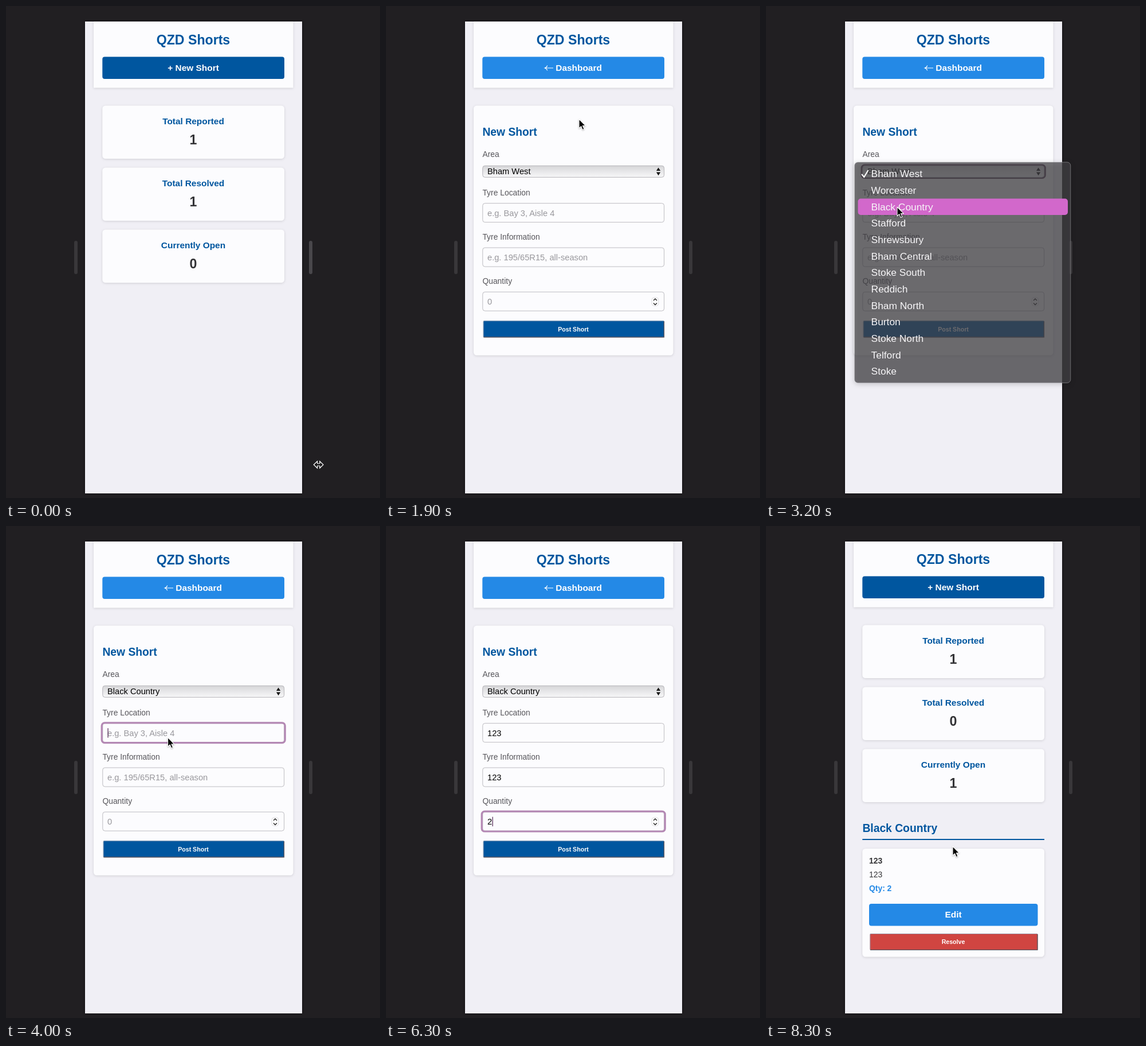
Write an HTML page that moves like this. It is 653x857 px and loops after 8400 ms.

```html
<!DOCTYPE html>
<html lang="en">
<head>
<meta charset="utf-8">
<title>Shorts board</title>
<style>
html, body { margin: 0; width: 100%; height: 100%; overflow: hidden; background: #211f22; }
svg { display: block; width: 653px; height: 857px; }
text { font-family: "Liberation Sans", Arial, Helvetica, sans-serif; white-space: pre; }
.card { fill: #fcfcfe; filter: drop-shadow(0 1.5px 2px rgba(0,0,0,.13)); }
.bold { font-weight: 700; }
.hidden { display: none; }
</style>
</head>
<body>
<svg id="stage" viewBox="0 0 653 857">
  <defs>
    <clipPath id="screen"><rect x="138" y="27" width="379" height="822"/></clipPath>
    <linearGradient id="selectFill" x1="0" y1="0" x2="0" y2="1">
      <stop offset="0" stop-color="#d6d6d8"/>
      <stop offset=".55" stop-color="#e9e9eb"/>
      <stop offset="1" stop-color="#f7f7f8"/>
    </linearGradient>
  </defs>
</svg>
<script>
const NS = "http://www.w3.org/2000/svg";
const BLUE = "#00569f", SKY = "#2489e6", RED = "#d04541", INK = "#333336", HINT = "#98979c";
const LOOP = 8400, STEP = 100;
const stage = document.getElementById("stage");

function add(parent, tag, attrs = {}) {
  const el = document.createElementNS(NS, tag);
  for (const k in attrs) el.setAttribute(k, attrs[k]);
  return parent.appendChild(el);
}
const group = (p, attrs) => add(p, "g", attrs);
const path = (p, d, attrs) => add(p, "path", { d, ...attrs });
function box(p, x, y, x2, y2, r, fill, more) {
  return add(p, "rect", { x, y, width: x2 - x, height: y2 - y, rx: r, fill, ...more });
}
function label(p, str, x, y, size, fill, more) {
  const el = add(p, "text", { x, y, "font-size": size, fill, ...more });
  el.textContent = str;
  return el;
}
const bold = (p, str, x, y, size, fill) => label(p, str, x, y, size, fill, { class: "bold" });
const centred = (p, str, y, size, fill) =>
  label(p, str, 327, y, size, fill, { class: "bold", "text-anchor": "middle" });
const card = (p, x, y, x2, y2, r = 5.5) => box(p, x, y, x2, y2, r, "#fcfcfe", { class: "card" });
const show = (el, on) => el.classList.toggle("hidden", !on);

// Button with a two-tone outset border
function outsetButton(p, x, y, x2, y2, fill, str) {
  box(p, x, y, x2, y2, 2, fill);
  path(p, `M${x + .5} ${y2 - 1}V${y + .5}H${x2 - 1}`, { fill: "none", stroke: "#8d9aae", "stroke-width": .8 });
  path(p, `M${x + .5} ${y2 - .6}H${x2 - .6}V${y + 1}`, { fill: "none", stroke: "#5b5660", "stroke-width": 1.4 });
  centred(p, str, (y + y2) / 2 + 3.8, 10.61, "#fff");
}

// Frame around the page
const handle = x => box(stage, x, 409, x + 6, 467, 3, "#39373a");
handle(119);
const rightHandle = handle(529);
box(stage, 138, 27, 517, 849, 0, "#f0eff5", { style: "filter:drop-shadow(0 0 2px rgba(0,0,0,.55))" });
const screen = group(stage, { "clip-path": "url(#screen)" });
const page = group(screen);

card(page, 153, 10, 501.5, 142.5, 0);
centred(page, "QZD Shorts", 67.4, 23.14, BLUE);

// Dashboard
const dash = group(page);
box(dash, 168.3, 88.5, 486, 127, 4, BLUE);
centred(dash, "+ New Short", 112.6, 15.43, "#fff");
const counts = ["Total Reported", "Total Resolved", "Currently Open"].map((name, i) => {
  const y = 173.5 + i * 108;
  card(dash, 168.3, y, 486, y + 92.5);
  centred(dash, name, y + 32.2, 15.43, BLUE);
  return centred(dash, "", y + 67.8, 23.14, INK);
});

const entry = group(dash);
bold(entry, "Black Country", 168.4, 534.4, 19.29, BLUE);
box(entry, 168.3, 546, 486, 548, 0, BLUE);
card(entry, 168.3, 563, 486, 751.5);
bold(entry, "123", 180, 589.3, 13.89, INK);
label(entry, "123", 180, 613.3, 13.89, INK);
bold(entry, "Qty: 2", 180, 637.3, 13.89, SKY);
box(entry, 180, 659, 474.5, 697.5, 4, SKY);
centred(entry, "Edit", 683, 15.43, "#fff");
outsetButton(entry, 181.5, 711, 474.5, 740, RED, "Resolve");

// Form
const form = group(page);
box(form, 168.3, 88.5, 486, 127, 4, SKY);
path(form, "M292 108H277.5M281.8 103.8Q280.5 107 277.3 108Q280.5 109 281.8 112.2",
  { fill: "none", stroke: "#fff", "stroke-width": 1.2 });
bold(form, "Dashboard", 296.3, 112.6, 15.43, "#fff");
card(form, 153, 173.5, 501.5, 608.5);
bold(form, "New Short", 168.4, 225.7, 19.29, BLUE);
["Area", "Tyre Location", "Tyre Information", "Quantity"].forEach((name, i) =>
  label(form, name, 168.4, [263.2, 329.9, 407.1, 484.2][i], 13.89, "#56555a"));

const ring = (y, y2, stroke) =>
  box(form, 167.2, y - .9, 487.2, y2 + .9, 5, "none", { stroke, "stroke-width": 3.2 });
const selectRing = ring(278, 298.5, "#5b4059");
box(form, 168.8, 278.3, 485.6, 298.3, 4, "url(#selectFill)", { stroke: "#b4b3b8" });
const area = label(form, "", 177, 293.3, 14.66, "#000");
path(form, "M472 287L475.6 281.4L479.2 287ZM472 289.6L475.6 295.2L479.2 289.6Z", { fill: "#111" });

const fields = [["e.g. Bay 3, Aisle 4", 343.7], ["e.g. 195/65R15, all-season", 421], ["0", 498.1]].map(([hint, y]) => {
  box(form, 168.8, y, 485.6, y + 33, 4, "#fcfcfe", { stroke: "#bdbcc1" });
  const text = label(form, "", 177, y + 21.8, 14.66, "#000");
  const focus = ring(y, y + 33, "#b488b4");
  const caret = box(form, 0, y + 8.5, 1.3, y + 25, 0, "#5e3560");
  return { hint, text, focus, caret };
});
box(form, 464.2, 507.8, 475.8, 522.4, 4, "#fff", { stroke: "#d5d4d8", "stroke-width": .8 });
path(form, "M467 513L470 510L473 513M467 517.6L470 520.6L473 517.6",
  { fill: "none", stroke: "#222", "stroke-width": 1.4 });
outsetButton(form, 169.8, 548.3, 486, 577.3, BLUE, "Post Short");

// Popup menu
const ITEM_H = 28.67;
const menu = group(stage);
box(menu, 154.5, 272, 531.8, 656.5, 6, "rgba(67,66,70,.72)",
  { stroke: "rgba(190,190,195,.45)", style: "filter:drop-shadow(0 2px 4px rgba(0,0,0,.25))" });
const pick = box(menu, 160.5, 0, 527, 28.5, 5, "#d268cb");
["Bham West", "Worcester", "Black Country", "Stafford", "Shrewsbury", "Bham Central", "Stoke South",
 "Reddich", "Bham North", "Burton", "Stoke North", "Telford", "Stoke"].forEach((name, i) =>
  label(menu, name, 183.6, 298.4 + i * ITEM_H, 17.36, "#f7f6f8"));
path(menu, "M167.5 293.5L171.2 298L178.2 286.6",
  { fill: "none", stroke: "#fff", "stroke-width": 2, "stroke-linecap": "round" });

// Pointers
const resize = path(stage, "M537.3 799L543.6 793V797H547.8V793L554 799L547.8 805V801H543.6V805Z",
  { fill: "#1b1a1c", stroke: "#fff", "stroke-width": 1.2 });
const arrow = path(stage, "M0 0V16L3.7 12.6L6.2 18.6L8.9 17.4L6.4 11.6H11.4Z",
  { fill: "#000", stroke: "#fff", "stroke-width": 1.1, "stroke-linejoin": "round",
    style: "filter:drop-shadow(0 1px 1px rgba(0,0,0,.3))" });

// time, x, y
const route = [
  [0, 545, 799], [100, 540, 780], [500, 420, 400], [900, 337, 112], [1400, 335, 108], [1900, 337, 197],
  [2300, 232, 288], [2600, 230, 290], [2900, 230, 322], [3200, 229, 350], [3500, 229, 350],
  [3800, 282, 366], [6500, 318, 520], [6800, 326, 558], [LOOP, 326, 558]
];
function pointAt(t) {
  const i = Math.max(1, route.findIndex(k => k[0] > t));
  const [t0, x0, y0] = route[i - 1], [t1, x1, y1] = route[i];
  const u = (t - t0) / (t1 - t0), e = u * u * (3 - 2 * u);
  return [x0 + (x1 - x0) * e, y0 + (y1 - y0) * e];
}

const typing = [[4300, 4500, 4700], [5100, 5300, 5500], [6100]];
const words = ["123", "123", "2"];
const focusSpans = [[3800, 4900], [4900, 5800], [5800, 7000]];
const within = (t, a, b) => t >= a && t < b;

function draw(t) {
  const onForm = within(t, 1300, 7100), posted = t >= 7100, open = within(t, 2500, 3500);
  show(dash, !onForm);
  show(form, onForm);
  show(entry, posted);
  (posted ? "101" : "110").split("").forEach((n, i) => counts[i].textContent = n);
  page.setAttribute("transform", `translate(0 ${t >= 8000 ? -1 : 0})`);

  area.textContent = t < 3500 ? "Bham West" : "Black Country";
  show(selectRing, within(t, 2500, 3800));
  fields.forEach((f, i) => {
    const typed = words[i].slice(0, typing[i].filter(at => t >= at).length);
    const active = within(t, ...focusSpans[i]);
    f.text.textContent = typed || f.hint;
    f.text.setAttribute("fill", typed ? "#000" : HINT);
    f.caret.setAttribute("x", 177.4 + typed.length * 8.15);
    show(f.focus, active);
    show(f.caret, active);
  });

  const [x, y] = pointAt(t);
  show(menu, open);
  const row = Math.max(0, Math.min(12, Math.floor((y - 278.2) / ITEM_H)));
  pick.setAttribute("y", 278.2 + row * ITEM_H);

  show(resize, t < 100);
  show(arrow, t >= 100 && !within(t, 4300, 6500));
  arrow.setAttribute("transform", `translate(${x} ${y})`);
  rightHandle.setAttribute("fill", t < 200 ? "#49474b" : "#39373a");
}

const start = performance.now();
function tick() {
  const t = Math.max(0, performance.now() - start) % LOOP;
  draw(Math.floor(t / STEP) * STEP);
  requestAnimationFrame(tick);
}
tick();
</script>
</body>
</html>
```
